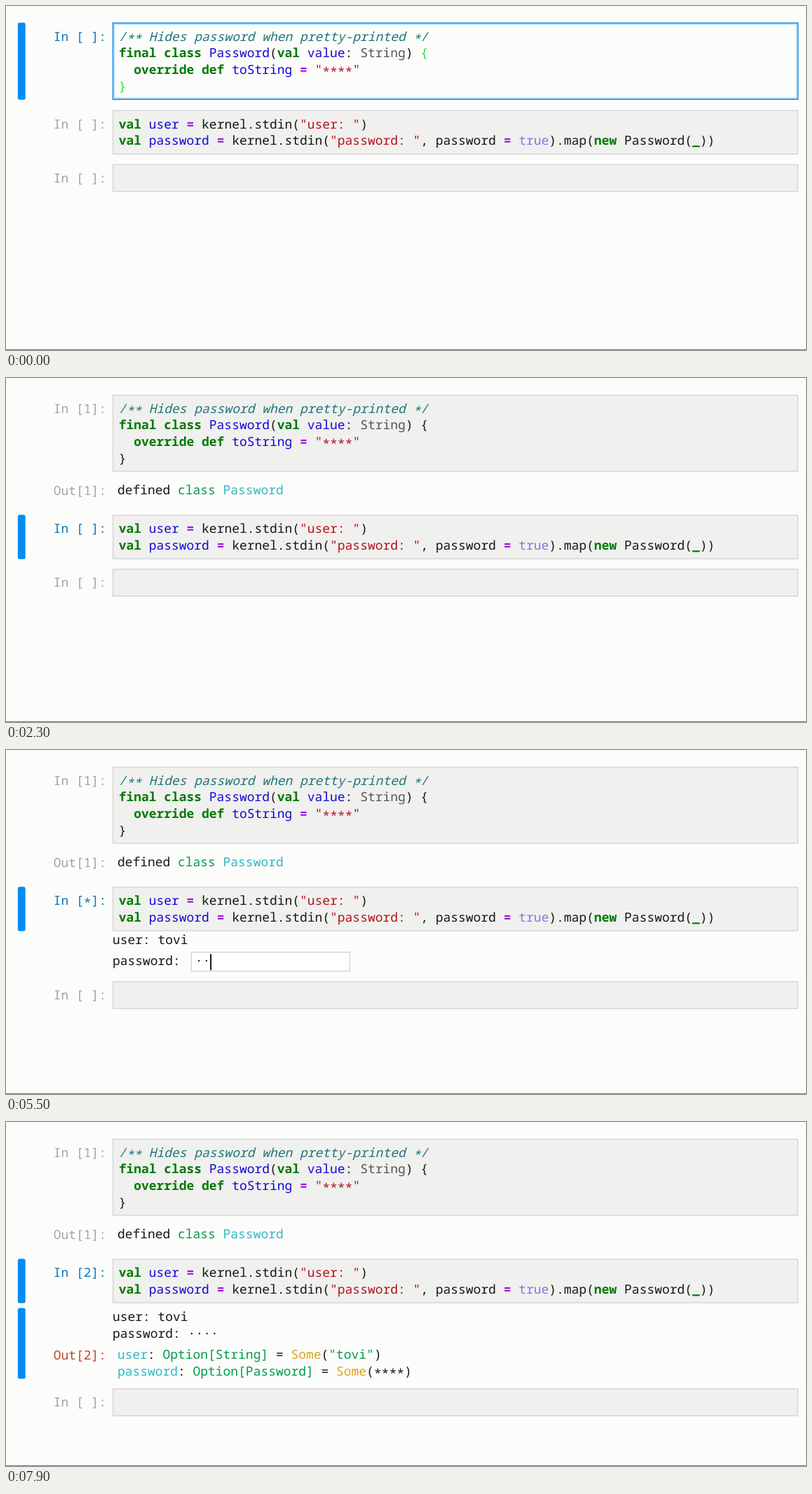
Write an HTML page that moves like this. It is 1141 by 491 pixels and loops after 8000 ms.

```html
<!DOCTYPE html>
<html lang="en">
<head>
<meta charset="utf-8">
<title>Notebook input prompt</title>
<style>
  html, body { margin: 0; width: 100%; height: 100%; overflow: hidden; background: #fcfcfb; }
  svg { display: block; width: 1141px; height: 491px; }
  text {
    font: 17.95px "Noto Sans Mono", "DejaVu Sans Mono", monospace;
    text-rendering: geometricPrecision; fill: #161616; white-space: pre;
  }
  .kw { fill: #007a00; font-weight: 700; }
  .def { fill: #1408d4; }
  .type { fill: #555; }
  .str { fill: #b6101f; }
  .op { fill: #a010dc; font-weight: 700; }
  .atom { fill: #7b79e6; }
  .note { fill: #1f7678; font-style: italic; }
  .match { fill: #1ee636; }
  .idle { fill: #a3a3a3; }
  .in { fill: #0b76b8; }
  .out { fill: #bf4526; }
  .green { fill: #00994d; }
  .cyan { fill: #2bbac4; }
  .gold { fill: #d8a51c; }
  .bar { fill: #068df2; }
  .box { fill: #f0f0ee; stroke: #cfd0d2; stroke-width: 1.2; }
  .edit { fill: #fcfcfb; stroke: #0b8cf0; stroke-width: 1.7; }
  .glow { fill: none; stroke: #b5dcf8; stroke-width: 1.6; }
  .field { fill: #fff; stroke: #c4c6c8; }
</style>
</head>
<body>
<svg id="stage" viewBox="0 0 1141 491" xmlns="http://www.w3.org/2000/svg"></svg>
<script>
const LOOP = 8000, LINE = 23.6, CHAR = 10.77, LEFT = 152, CODE = 160.7;
const NAME = 'tovi', DOTS = '····';
const stage = document.getElementById('stage');

// Each entry overrides the state from its time onward.
const timeline = [
  [0, { first: ' ', second: ' ', selected: 1, editing: true }],
  [1600, { first: '*', selected: 2, editing: false }],
  [2000, { first: '1' }],
  [3000, { second: '*', selected: 3 }],
  [3800, { selected: 2, ask: 'user: ', answer: NAME, from: 4000 }],
  [4600, { ask: '', lines: ['user: ' + NAME] }],
  [5000, { ask: 'password: ', answer: DOTS, from: 5300 }],
  [6100, { ask: '', lines: ['user: ' + NAME, 'password: ' + DOTS] }],
  [6600, { second: '2', done: true }]
];

// Asterisks sit at mid-height; markup such as {kw:val} becomes a coloured run.
const runs = s => s
  .replace(/\*+/g, '<tspan baseline-shift="-3">$&</tspan>')
  .replace(/\{(\w+):([^}]*)\}/g, '<tspan class="$1">$2</tspan>');
const text = (x, y, s, cls = '') => `<text x="${x}" y="${y}" class="${cls}" xml:space="preserve">${runs(s)}</text>`;
const rect = (x, y, w, h, cls, r = 0) =>
  `<rect x="${x}" y="${y}" width="${w}" height="${h}" rx="${r}" class="${cls}"/>`;
const caret = (x, y) => rect(x, y, 1.8, 23, '');
const bar = (y, h) => rect(16.8, y, 10.9, h, 'bar', 2.5);
const block = (x, y, lines) => lines.map((s, i) => text(x, y + i * LINE, s)).join('');

const passwordClass = bracket => [
  '{note:/** Hides password when pretty-printed */}',
  `{kw:final} {kw:class} {def:Password}({kw:val} {def:value}: {type:String}) ${bracket('&#123;')}`,
  '  {kw:override} {kw:def} {def:toString} {op:=} {str:"****"}',
  bracket('&#125;')
];
const prompts = [
  '{kw:val} {def:user} {op:=} kernel.stdin({str:"user: "})',
  '{kw:val} {def:password} {op:=} kernel.stdin({str:"password: "}, password {op:=} {atom:true}).map({kw:new} Password({kw:_}))'
];
const results = [
  `{cyan:user}: {green:Option[String]} = {gold:Some}({green:"${NAME}"})`,
  '{cyan:password}: {green:Option[Password]} = {gold:Some}(****)'
];

function cell(y, h, mark, lines, selected, editing) {
  let s = selected ? bar(y, h) : '';
  s += rect(LEFT + .6, y + .6, 976.8, h - 1.2, editing ? 'edit' : 'box');
  if (editing) s += rect(LEFT + 2.4, y + 2.4, 973.2, h - 4.8, 'glow');
  return s + text(67.8, y + 26, `In [${mark}]:`, selected ? 'in' : 'idle') +
    block(CODE, y + 26, lines);
}

function inputRow(y, state, t) {
  const n = Math.max(0, Math.min(4, Math.floor((t - state.from) / 150) + 1));
  const x = LEFT + state.ask.length * CHAR + 4;
  return text(LEFT, y + 19, state.ask) + rect(x + .5, y + .5, 226, 27, 'field') +
    text(x + 6, y + 19, state.answer.slice(0, n)) + caret(x + 6 + n * CHAR, y + 3);
}

function draw(t) {
  const state = Object.assign({ ask: '', lines: [], done: false },
    ...timeline.filter(([at]) => at <= t).map(([, change]) => change));
  const { first, second, selected, editing, ask, lines, done } = state;
  const ran = first === '1';
  const top = ran ? 195.2 : 148.6;
  const below = top + 63.4;
  const last = done ? 380.2 : below + 13.8 + lines.length * LINE + (ask ? 34 : 0);
  const bracket = s => editing ? `{match:${s}}` : s;

  let s = cell(23.8, 110, first, passwordClass(bracket), selected === 1, editing);
  if (editing && t >= 100 && (t - 100) % 1000 < 500) s += caret(171.2, 103);
  if (ran) s += text(67.8, 167.4, 'Out[1]:', 'idle') +
    text(158.9, 166.4, 'defined {green:class} {cyan:Password}');

  s += cell(top, 63.4, second, prompts, selected === 2, false);
  s += block(LEFT, below + (done ? 25.4 : 18.4), lines);
  if (ask) s += inputRow(below + 6 + lines.length * LINE, state, t);
  if (done) s += bar(265.4, 101) + text(67.8, 339.2, 'Out[2]:', 'out') + block(158.9, 338, results);

  s += cell(last, 39.6, ' ', [], selected === 3, false);
  stage.innerHTML = s + '<rect y="490" width="1141" height="1" fill="#777"/>';
}

let shown = -1;
const start = performance.now();
function tick(now) {
  const t = Math.floor((Math.max(0, now - start) % LOOP) / 50) * 50;
  if (t !== shown) draw(shown = t);
  requestAnimationFrame(tick);
}
draw(shown = 0);
requestAnimationFrame(tick);
</script>
</body>
</html>
```
